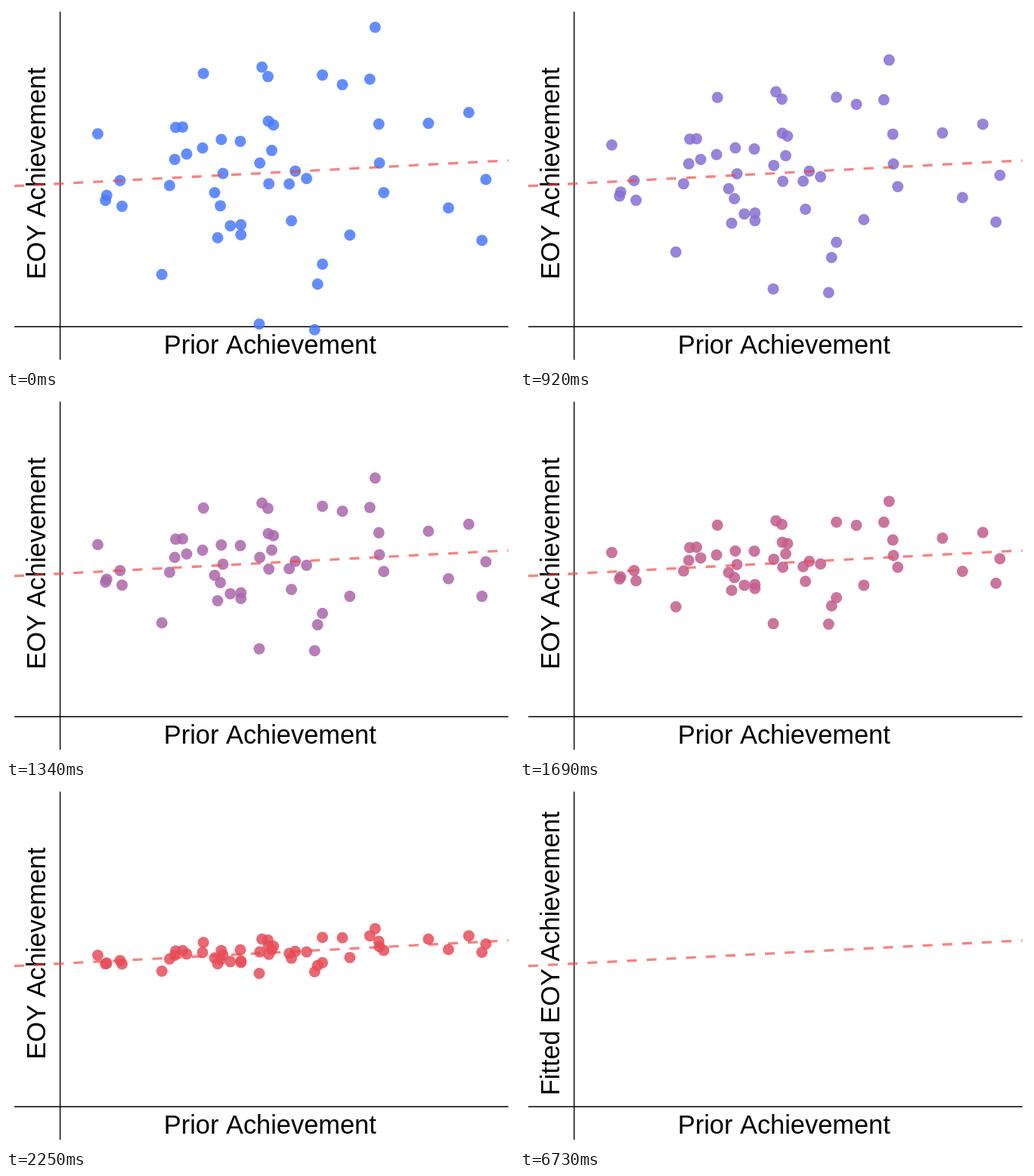
An HTML page for the animation above (6.87 s loop, 672 by 480 pixels).

```html
<!DOCTYPE html>
<html lang="en">
<head>
<meta charset="utf-8">
<title>Fitted values</title>
<style>
  html, body { margin: 0; width: 100%; height: 100%; overflow: hidden; background: #fff; }
  svg { display: block; }
  text { font: 34.4px "Liberation Sans", Arial, sans-serif; font-kerning: none; text-anchor: middle; }
  .axis { stroke: #000; stroke-width: 1.4; }
  #fit { stroke: #f44540; stroke-opacity: .67; stroke-width: 3.3; stroke-dasharray: 13.06; }
</style>
</head>
<body>
<svg width="672" height="480" viewBox="0 0 672 480">
  <path class="axis" d="M71.6 7.5V469M11 425.3H664.5"/>
  <text x="349.3" y="461">Prior Achievement</text>
  <text id="label" transform="translate(52 222) rotate(-90)"></text>
  <g id="dots" fill-opacity=".85"></g>
  <line id="fit" x1="11" x2="664.5"/>
</svg>
<script>
const LOOP = 6870, START = 500, STEP = 70, STEPS = 30, RELABEL = 2880, CLEAR = 6730;
const BLUE = [72, 121, 255], RED = [244, 69, 64];

const points = [
  [488.3, 28.3], [261.2, 89.5], [338.6, 81], [346.5, 93.6], [418.6, 91.6], [445, 104.3], [481.3, 97],
  [121.4, 169.5], [224.5, 161], [233.6, 160.4], [347, 152.8], [353.8, 157.8], [493.2, 156.6],
  [558.8, 155.6], [612.2, 141.2], [284.8, 177], [310, 179.4], [260, 188.3], [239, 196.3], [223.2, 203.5],
  [351.5, 191.6], [335.7, 208.2], [287, 222], [382.7, 218.9], [397.6, 228.8], [494, 208.2],
  [150.9, 231.5], [216.4, 238], [347.7, 235.8], [374.6, 236], [634.8, 230], [499.7, 247.5],
  [133.2, 251], [131.6, 257.8], [153.5, 265.6], [276, 247.5], [283.6, 264.9], [585.3, 267.8],
  [296.8, 291.4], [310.8, 290], [310.8, 303.3], [280, 307.2], [377.6, 284.7], [454.8, 303.8],
  [629.6, 310.7], [206.2, 356], [418.6, 342.3], [412.2, 368.7], [335, 421.8], [408.3, 429.2]
];

const $ = id => document.getElementById(id);
const mix = (a, b, p) => a + (b - a) * p;
const lineY = x => 238.7 - 0.0519 * (x - 11);
const dots = $("dots"), label = $("label"), fit = $("fit");

fit.setAttribute("y1", lineY(11));
fit.setAttribute("y2", lineY(664.5));

const circles = points.map(([x]) => {
  const c = document.createElementNS("http://www.w3.org/2000/svg", "circle");
  c.setAttribute("cx", x);
  c.setAttribute("r", 7.5);
  return dots.appendChild(c);
});

// Red and green blend by their squares, blue blends linearly.
function blend(p) {
  const [r, g] = [0, 1].map(i => Math.sqrt(mix(BLUE[i] ** 2, RED[i] ** 2, p)));
  return `rgb(${r}, ${g}, ${mix(BLUE[2], RED[2], p)})`;
}

function draw(now) {
  const t = now % LOOP;
  const step = Math.floor((t - START) / STEP) + 1;
  const p = Math.min(Math.max(step, 0), STEPS) / STEPS;
  circles.forEach((c, i) => {
    const [x, y] = points[i];
    c.setAttribute("cy", mix(y, lineY(x), p));
  });
  dots.setAttribute("fill", blend(p));
  dots.setAttribute("visibility", t < CLEAR ? "visible" : "hidden");
  label.textContent = (t < RELABEL ? "" : "Fitted ") + "EOY Achievement";
}

const begin = performance.now();
function tick() {
  draw(performance.now() - begin);
  requestAnimationFrame(tick);
}
tick();
</script>
</body>
</html>
```
